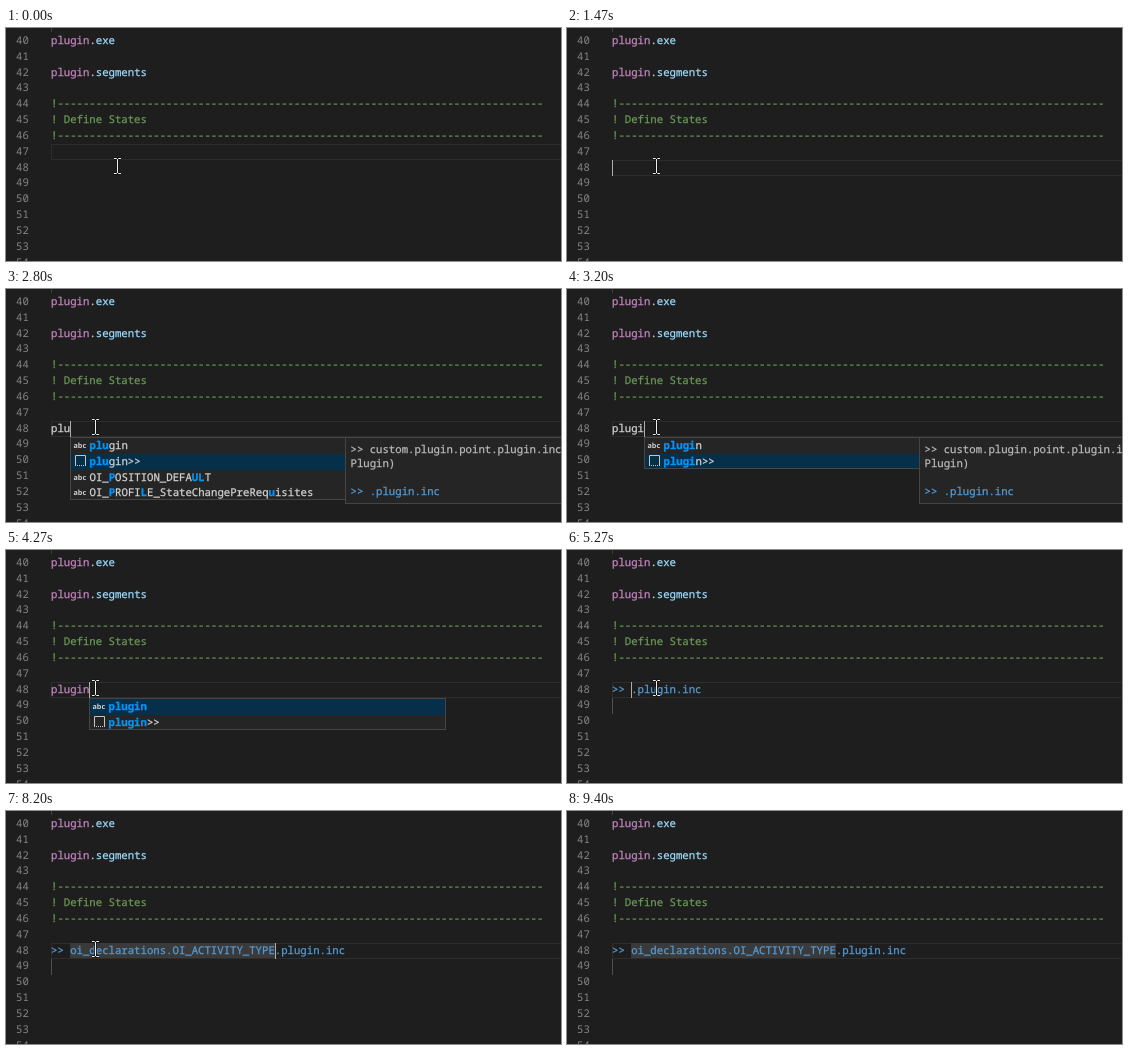
Recreate the animation shown at these times as an HTML page. Size 555 by 233 pixels, loop 9.59 s.

```html
<!DOCTYPE html>
<html lang="en">
<head>
<meta charset="utf-8">
<title>Editor snippet</title>
<style>
  html, body { margin: 0; width: 100%; height: 100%; overflow: hidden; background: #1e1e1e; }
  svg { display: block; width: 555px; height: 233px; }
  text {
    font: 10.667px "Noto Sans Mono", "DejaVu Sans Mono", monospace;
    white-space: pre;
    text-rendering: geometricPrecision;
    color: #d4d4d4;
  }
  text, tspan { fill: currentColor; stroke: currentColor; stroke-width: .25px; }
  .num { color: #858585; stroke: none; }
  .kw { color: #c586c0; }
  .prop { color: #9cdcfe; }
  .note { color: #6a9955; }
  .inc { color: #569cd6; }
  .hit { color: #0097fb; font-weight: bold; }
  .doc { color: #bbb; }
  .abc { font: bold 7.2px "Open Sans", sans-serif; color: #d0d0d0; stroke: none; }
  .panel { fill: #252526; stroke: #454545; }
</style>
</head>
<body>
<svg viewBox="0 0 555 233">
  <g id="back"></g>
  <g id="code"></g>
  <g id="live"></g>
</svg>
<script>
const LOOP = 9590, LEFT = 45, CHAR = 6.4, ROW = 15.83;

const baseline = n => Math.round(16 + ROW * (n - 40));
const colX = c => Math.floor(LEFT + CHAR * c);
const text = (x, y, body, cls = '') => `<text x="${x}" y="${y}" class="${cls}">${body}</text>`;
const span = (cls, body) => `<tspan class="${cls}">${body}</tspan>`;
const rect = (x, y, w, h, fill) => `<rect x="${x}" y="${y}" width="${w}" height="${h}" fill="${fill}"/>`;
const panel = (x, y, w, h) =>
  `<rect class="panel" x="${x + .5}" y="${y + .5}" width="${w - 1}" height="${h - 1}"/>`;

// Suggestion lists: brackets mark the matched letters.
const menus = {
  p: { sel: 0, docs: true, rows: ['[p]lugin>>', '[P]lease', '[P]rivilege',
    '[P]rofile_DeliveryContractRecNo', '[P]rofile_TmRecNo', '[P]resent', '[P]rint'] },
  pl: { sel: 1, docs: true, rows: ['[pl]ugin', '[pl]ugin>>', '[Pl]ease',
    'OI_[P]OSITION_DEFAU[L]T', 'OI_[P]ROFI[L]E_StateChangePreRequisites', '[P]rivi[l]ege'] },
  plu: { sel: 1, docs: true, rows: ['[plu]gin', '[plu]gin>>',
    'OI_[P]OSITION_DEFA[UL]T', 'OI_[P]ROFI[L]E_StateChangePreReq[u]isites'] },
  plug: { sel: 1, docs: true, rows: ['[plug]in', '[plug]in>>'] },
  plugi: { sel: 1, docs: true, rows: ['[plugi]n', '[plugi]n>>'] },
  plugin: { sel: 0, rows: ['[plugin]', '[plugin]>>'] },
  down: { sel: 1, rows: ['[plugin]', '[plugin]>>'] },
  downDocs: { sel: 1, docs: true, rows: ['[plugin]', '[plugin]>>'] }
};

const path = 'oi_declarations.OI_ACTIVITY_TYPE';
const type = (word, menu = word) => ({ word, menu, col: word.length, menuCol: word.length, caret: 1 });
const on = { caret: 1 }, off = { caret: 0 };
const mouse = (x, y = 138) => ({ mouse: [x, y] });

// Each step changes part of the state and holds until the next.
const steps = [
  [0, { line: 47, word: '', col: 0, caret: 0, ...mouse(111) }],
  [130, mouse(106)], [200, mouse(94)], [270, mouse(89)],
  [530, { line: 48, caret: 1 }],
  [1000, off], [1470, on], [2000, off],
  [2270, type('p', '')],
  [2330, { menu: 'p' }],
  [2400, { word: 'pl', col: 2 }],
  [2470, type('pl')],
  [2800, type('plu')],
  [3000, type('plug')],
  [3200, type('plugi')],
  [3270, type('plugin')],
  [3730, off], [4270, on],
  [4670, { menu: 'down' }],
  [4730, { menu: 'downDocs', caret: 0 }],
  [5270, { word: '', menu: '', snippet: true, slot: '', col: 3, caret: 1 }],
  [5730, off], [6200, on], [6730, off],
  [7200, { slot: path, col: 3 + path.length, caret: 1 }],
  [7670, off], [8200, on], [8670, off],
  [8800, mouse(88, 149)], [8870, mouse(84, 171)], [8930, mouse(78, 201)],
  [9000, mouse(73, 226)], [9070, { mouse: null }],
  [9200, on], [9400, off]
];
let held = {};
const states = steps.map(([, change]) => held = { ...held, ...change });

function drawCode() {
  const rule = '!' + '-'.repeat(76);
  let out = rect(LEFT, 0, 1, 4, '#404040');
  for (let n = 39; n <= 54; n++) out += text(10, baseline(n), n, 'num');
  const line = (n, body, cls) => out += text(LEFT, baseline(n), body, cls);
  line(40, span('kw', 'plugin') + '.' + span('prop', 'exe'));
  line(42, span('kw', 'plugin') + '.' + span('prop', 'segments'));
  line(44, rule, 'note');
  line(45, '! Define States', 'note');
  line(46, rule, 'note');
  return out;
}

function drawMenu({ menu, menuCol }) {
  const { rows, sel, docs } = menus[menu];
  const x = colX(menuCol), top = 148, width = docs ? 276 : 357;
  const height = Math.round(rows.length * ROW);
  const selTop = Math.round(top + 1 + sel * ROW);
  const selHeight = Math.min(16, top + height - 1 - selTop);
  let out = panel(x, top, width, height);
  out += rect(x + 1, selTop, width - 2, selHeight, '#062f4a');
  rows.forEach((row, i) => {
    const y = Math.round(top + 12 + i * ROW);
    out += row.endsWith('>>')
      ? `<path d="M${x + 5.5} ${y + .5}v-10h10v10" fill="none" stroke="#c5c5c5"/>
         <path d="M${x + 5} ${y + .5}h11" stroke="#c5c5c5" stroke-dasharray="1 1"/>`
      : text(x + 3.5, y - 1, 'abc', 'abc');
    out += text(x + 19.5, y, row.replace(/\[(.*?)\]/g, (_, hit) => span('hit', hit)));
  });
  if (rows.length > 6) out += rect(x + 267, top + 20, 8, 70, '#3e3e3f');
  if (docs) {
    const left = x + width - 1, tx = left + 5.5;
    out += panel(left, top, 276, 67);
    out += text(tx, 164, '>> custom.plugin.point.plugin.inc (', 'doc');
    out += text(tx, 178, 'Plugin)', 'doc');
    out += text(tx, 206, '>> .plugin.inc', 'inc');
  }
  return out;
}

function drawMouse([x, y]) {
  const d = `M${x - 3} ${y - 7.5}h2.5l1 1l1 -1h2.5M${x + .5} ${y - 7}v14` +
    `M${x - 3} ${y + 7.5}h2.5l1 -1l1 1h2.5`;
  return `<g fill="none"><path d="${d}" stroke="#111" stroke-width="2.4"/>
    <path d="${d}" stroke="#f0f0f0"/></g>`;
}

function drawBack(s) {
  const y = s.line === 47 ? 116 : 132;
  let out = `<rect x="${LEFT + .5}" y="${y + .5}" width="520" height="15" fill="none" stroke="#2d2d2d"/>`;
  if (s.slot) out += rect(colX(3), 132, colX(3 + s.slot.length) - colX(3), 15, '#3a3a3a');
  if (s.snippet) out += rect(LEFT, 148, 1, 16, '#505050');
  return out;
}

function drawLive(s) {
  const y = baseline(48);
  let out = s.snippet
    ? text(LEFT, y, `>> ${s.slot}.plugin.inc`, 'inc')
    : text(LEFT, y, s.word, s.word === 'plugin' ? 'kw' : '');
  if (s.caret) out += rect(colX(s.col), 132, 1, 16, '#aeafad');
  if (s.menu) out += drawMenu(s);
  if (s.mouse) out += drawMouse(s.mouse);
  return out;
}

const back = document.getElementById('back');
const live = document.getElementById('live');
document.getElementById('code').innerHTML = drawCode();

let shown = -1;
function tick() {
  const t = performance.now() % LOOP;
  const now = steps.findLastIndex(([at]) => at <= t);
  if (now !== shown) {
    shown = now;
    back.innerHTML = drawBack(states[now]);
    live.innerHTML = drawLive(states[now]);
  }
  requestAnimationFrame(tick);
}
tick();
</script>
</body>
</html>
```
